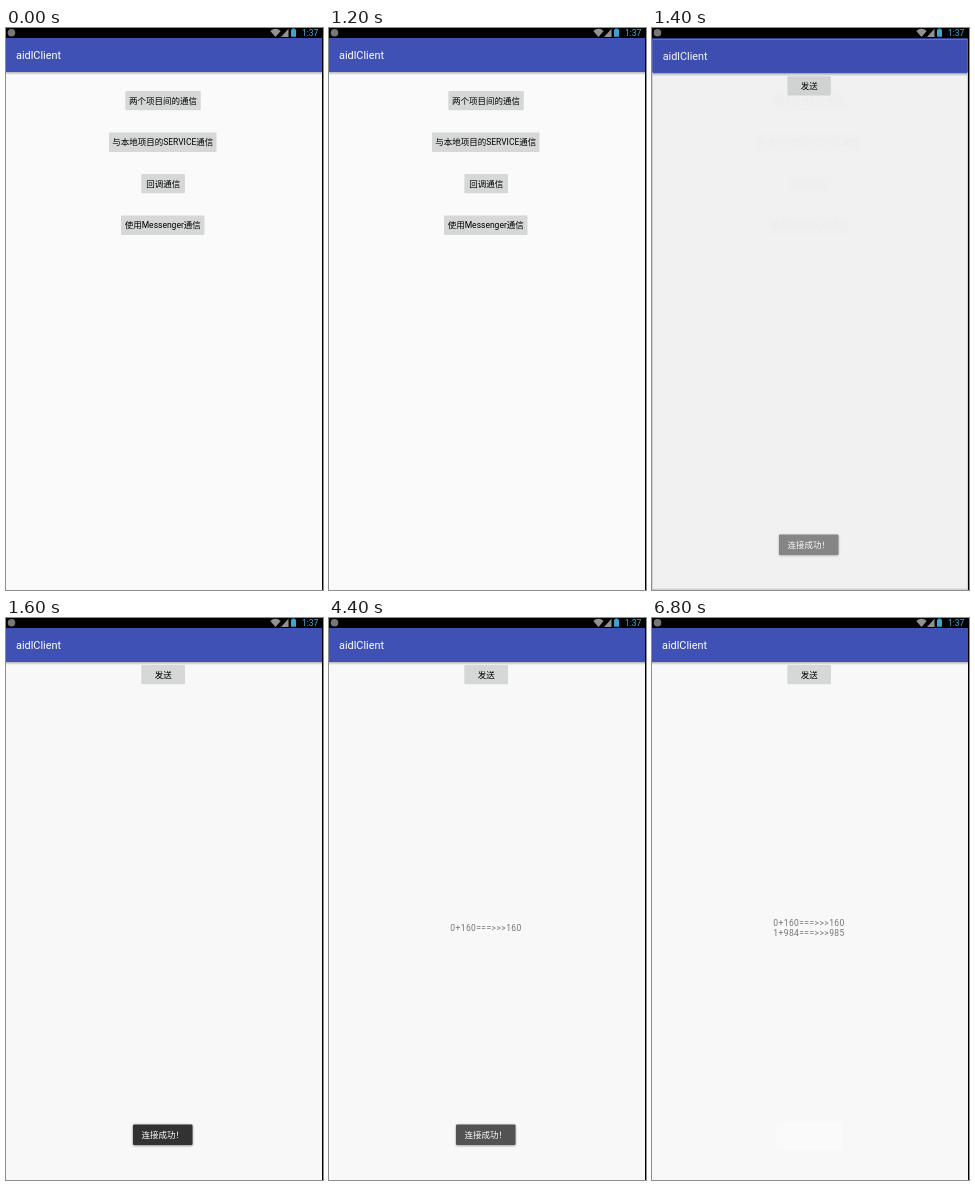
Write an HTML page that moves like this. It is 317 by 562 pixels and loops after 8 s.

```html
<!DOCTYPE html>
<html lang="zh">
<head>
<meta charset="utf-8">
<style>
  html, body { margin: 0; width: 100%; height: 100%; overflow: hidden; background: #000; }
  svg { display: block; width: 100vw; height: 100vh; }
  text { font: 8.5px Roboto, "Noto Sans CJK SC", "Noto Sans CJK", sans-serif; }
  .title { font-size: 10.9px; fill: #fff; }
  .center { text-anchor: middle; }
  .button { fill: #d6d7d7; }
  .result { fill: #737373; letter-spacing: .42px; }
</style>
</head>
<body>
<svg viewBox="0 0 317 562">
  <defs>
    <linearGradient id="barShadow" x2="0" y2="1">
      <stop stop-opacity=".28"/><stop offset="1" stop-opacity="0"/>
    </linearGradient>
    <filter id="toastShadow" x="-20%" y="-40%" width="140%" height="180%">
      <feDropShadow dx="0" dy=".7" stdDeviation="1.1" flood-opacity=".5"/>
    </filter>
    <g id="toolbar">
      <rect y="44" width="316" height="3" fill="url(#barShadow)"/>
      <rect y="10" width="316" height="34" fill="#3f51b5"/>
      <text class="title" x="10" y="31">aidlClient</text>
    </g>
  </defs>

  <rect width="317" height="562"/>
  <circle cx="5.5" cy="4.8" r="3.8" fill="#777"/>
  <g fill="#929292">
    <path d="M264.3 3Q269.5 -1.5 274.7 3L269.5 9Z"/>
    <path d="M275 9L282.5 .8V9Z"/>
  </g>
  <path d="M285 1.4H286.3V.4H288.7V1.4H290V8.8H285Z" fill="#3aa5cf"/>
  <text x="296" y="8.2" fill="#33b5e5">1:37</text>

  <g id="menu">
    <rect y="10" width="316" height="552" fill="#fafafa"/>
    <use href="#toolbar"/>
    <g id="menuButtons"></g>
    <rect id="dim" y="10" width="316" height="552"/>
  </g>

  <g id="sender">
    <rect y="10" width="316" height="552" fill="#f8f8f8"/>
    <use href="#toolbar"/>
    <g id="senderButtons"></g>
    <rect id="ghost" x="124" y="504" width="66" height="28" rx="2" fill="#fafafa"/>
    <text class="result center" x="157" id="line1"></text>
    <text class="result center" x="157" id="line2"></text>
    <rect id="tint" y="10" width="316" height="552"/>
  </g>

  <g id="toast">
    <rect x="127" y="506.5" width="59.5" height="20.5" rx="1" fill="#303231" filter="url(#toastShadow)"/>
    <text x="135.5" y="520" fill="#fff">连接成功！</text>
  </g>
</svg>

<script>
const LOOP = 8000, STEP = 100;
const byId = id => document.getElementById(id);
const set = (id, attrs) => {
  for (const name in attrs) byId(id).setAttribute(name, attrs[name]);
};
const clamp = x => Math.max(0, Math.min(1, x));

function addButton(parent, id, label, x, y, width, height) {
  byId(parent).innerHTML +=
    `<rect id="${id}" class="button" x="${x}" y="${y}" width="${width}" height="${height}" rx="1"/>
     <text class="center" x="${x + width / 2}" y="${y + height / 2 + 3.1}">${label}</text>`;
}
addButton('menuButtons', 'projects', '两个项目间的通信', 119.3, 63, 75.5, 19.3);
addButton('menuButtons', 'service', '与本地项目的SERVICE通信', 103, 104.4, 107.5, 19.6);
addButton('menuButtons', 'callback', '回调通信', 135.3, 146, 43.7, 19.3);
addButton('menuButtons', 'messenger', '使用Messenger通信', 115, 187.4, 83.5, 19.6);
addButton('senderButtons', 'send', '发送', 135.3, 47, 43.7, 19.3);

// Linear interpolation through [time, value] pairs
function track(t, keys) {
  if (t <= keys[0][0]) return keys[0][1];
  for (let i = 1; i < keys.length; i++) {
    const [t0, a] = keys[i - 1], [t1, b] = keys[i];
    if (t <= t1) return a + (b - a) * (t - t0) / (t1 - t0);
  }
  return keys[keys.length - 1][1];
}

function press(id, down) {
  byId(id).style.fill = down ? '#cbcbcb' : '';
}

function draw(t) {
  press('projects', t === 1100);
  press('send', t === 2500);

  const scale = track(t, [[1200, .8], [1300, .93], [1400, .995], [1500, 1]]);
  set('sender', {
    opacity: track(t, [[1200, 0], [1300, .63], [1400, .97], [1500, 1]]),
    transform: `translate(157.3 286) scale(${scale}) translate(-157.3 -286)`
  });
  set('dim', { opacity: track(t, [[1200, 0], [1300, .18]]) });
  set('tint', { opacity: track(t, [[1300, 0], [1400, .02], [1600, 0]]) });

  const fadeIn = track(t, [[1200, 0], [1300, .2], [1400, .56], [1500, .85], [1600, 1]]);
  const fadeOut = clamp((t - 4300) / 600);
  set('toast', { opacity: fadeIn * (1 - fadeOut) });
  set('ghost', { opacity: fadeOut });

  const two = t >= 6800;
  byId('line1').textContent = t >= 4400 ? '0+160===>>>160' : '';
  byId('line2').textContent = two ? '1+984===>>>985' : '';
  set('line1', { y: two ? 307.8 : 312.8 });
  set('line2', { y: 317.9 });
}

const start = performance.now();
function tick() {
  const t = (performance.now() - start) % LOOP;
  draw(Math.floor(t / STEP) * STEP);
  requestAnimationFrame(tick);
}
tick();
</script>
</body>
</html>
```
